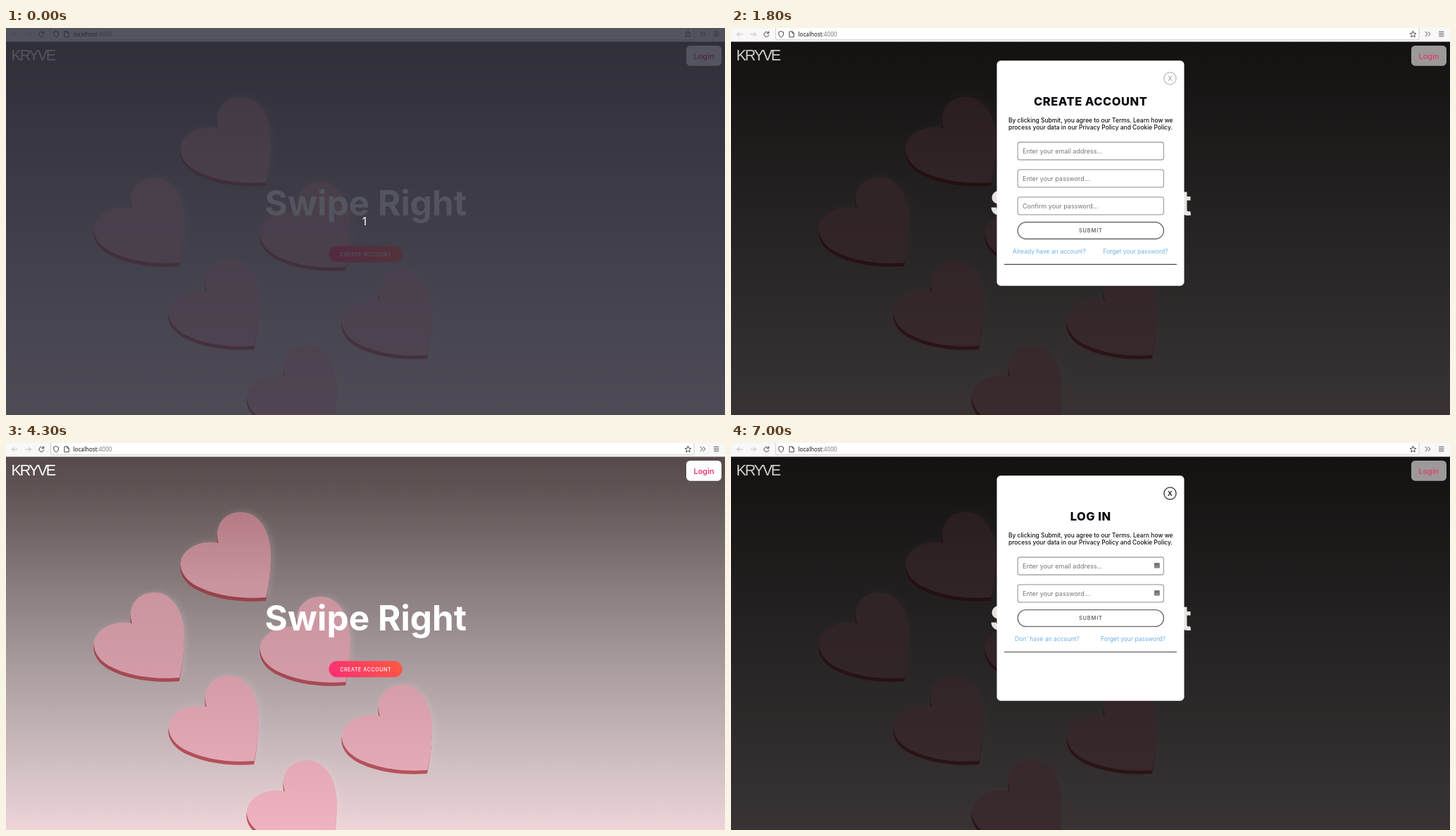
Write an HTML page that moves like this. It is 1021 px wide and 549 px high and loops after 8000 ms.

```html
<!DOCTYPE html>
<html lang="en">
<head>
<meta charset="utf-8">
<title>Landing page with sign-up dialogs</title>
<style>
  html, body { margin: 0; width: 100%; height: 100%; overflow: hidden; background: #fff; }
  svg { display: block; width: 1021px; height: 549px; font-family: Inter, "Open Sans", sans-serif; }
  .mid { text-anchor: middle; }
  .icon { fill: none; stroke: #45454c; stroke-width: 1; stroke-linecap: round; stroke-linejoin: round; }
  .off { stroke: #bdbdc1; }
  .field rect { fill: #fff; stroke: #a6a6a6; stroke-width: 1.3; }
  .field text { font-size: 9px; fill: #757575; }
  .submit rect { fill: #fff; stroke: #696969; stroke-width: 1.4; }
  .submit text { font-size: 7.5px; font-weight: 600; letter-spacing: .75px; fill: #696969; }
  .submit.hot rect { stroke: #111; }
  .submit.hot text { fill: #111; }
  .close circle { fill: #fff; stroke: #b5b5b5; stroke-width: 1.2; }
  .close text { font-size: 9.5px; font-weight: 500; fill: #a2a2a2; }
  .close.hot circle { stroke: #222; }
  .close.hot text { fill: #111; font-weight: 600; }
  .title { font-size: 16.5px; font-weight: 800; letter-spacing: .5px; fill: #0b0711; }
  .terms { font-size: 8.45px; font-weight: 500; fill: #111; }
  .link { font-size: 8.5px; fill: #6fb0e0; }
</style>
</head>
<body>
<svg viewBox="0 0 1021 549" xmlns="http://www.w3.org/2000/svg">
  <defs>
    <linearGradient id="sky" gradientUnits="userSpaceOnUse" x1="0" y1="19" x2="0" y2="549">
      <stop offset="0" stop-color="#554a49"/>
      <stop offset=".09" stop-color="#5f5554"/>
      <stop offset=".34" stop-color="#877b7c"/>
      <stop offset=".53" stop-color="#a4979a"/>
      <stop offset=".72" stop-color="#c0b1b4"/>
      <stop offset=".9" stop-color="#dcc9cc"/>
      <stop offset="1" stop-color="#efd4d9"/>
    </linearGradient>
    <linearGradient id="felt" gradientUnits="userSpaceOnUse" x1="0" y1="97" x2="0" y2="549">
      <stop offset="0" stop-color="#b37b84"/>
      <stop offset=".22" stop-color="#c9949e"/>
      <stop offset=".5" stop-color="#d29ba7"/>
      <stop offset=".8" stop-color="#e4a9b6"/>
      <stop offset="1" stop-color="#f0b3c1"/>
    </linearGradient>
    <linearGradient id="edge" gradientUnits="userSpaceOnUse" x1="0" y1="97" x2="0" y2="549">
      <stop offset="0" stop-color="#893a40"/>
      <stop offset="1" stop-color="#bf5763"/>
    </linearGradient>
    <linearGradient id="warm" x1="0" y1=".6" x2="1" y2=".4">
      <stop offset="0" stop-color="#fe3072"/>
      <stop offset="1" stop-color="#fb5844"/>
    </linearGradient>
    <linearGradient id="warmBack" x1="1" y1=".6" x2="0" y2=".4">
      <stop offset="0" stop-color="#fe3072"/>
      <stop offset="1" stop-color="#f65a42"/>
    </linearGradient>
    <filter id="soft" x="-20%" y="-20%" width="140%" height="140%"><feGaussianBlur stdDeviation="4"/></filter>
  </defs>

  <rect y="19" width="1021" height="530" fill="url(#sky)"/>
  <g id="hearts"></g>
  <rect id="dim" y="19" width="1021" height="530" fill="#000" opacity=".76"/>

  <g id="toolbar">
    <rect width="1021" height="19.5" fill="#f8f8f9"/>
    <rect x="63.5" y="-2" width="913.5" height="18.8" rx="2" fill="#fff" stroke="#cdcdd2" stroke-width="1"/>
    <path class="icon off" d="M16 9H8.5M11.5 6L8.5 9L11.5 12M28 9H35.5M32.500 6L35.500 9L32.500 12"/>
    <path class="icon" d="M53.300 7A3.500 3.500 0 1 0 53.800 10M53.800 5V7.500H51.300"/>
    <path class="icon" d="M71.200 4.800L74.500 6V9Q74.300 11.800 71.200 13.200Q68 11.800 67.800 9V6Z"/>
    <path class="icon" d="M83.300 5H87L89.300 7.300V12.800H83.300ZM87 5V7.300H89.300"/>
    <path class="icon" d="M968.500 4.500L969.800 7.300L972.800 7.700L970.600 9.800L971.200 12.800L968.500 11.300L965.800 12.800L966.400 9.800L964.200 7.700L967.200 7.300Z"/>
    <path class="icon" d="M986 5.500L989 8.500L986 11.500M990 5.500L993 8.500L990 11.500M1005.500 5.700H1012M1005.500 8.500H1012M1005.500 11.300H1012"/>
    <text x="95.500" y="11.800" font-size="8.100" font-family="'Noto Sans', sans-serif" fill="#18181c">localhost<tspan fill="#7c7c82">:4000</tspan></text>
  </g>

  <text id="brand" x="7.500" y="46" font-size="21.500" letter-spacing="-2.200" font-family="'Liberation Sans', Arial, sans-serif">KRYVE</text>
  <g class="mid">
    <rect id="loginBox" x="966" y="25" width="50" height="28.700" rx="5.500"/>
    <text id="loginText" x="991" y="43.500" font-size="11" font-weight="500">Login</text>
    <text id="headline" x="510.800" y="266" font-size="49.500" font-weight="700">Swipe Right</text>
    <g id="create">
      <rect id="createBox" x="458.500" y="309.300" width="104.200" height="23" rx="11.500"/>
      <text x="510.700" y="323.700" font-size="7.200" font-weight="500" letter-spacing=".5" fill="#fff">CREATE ACCOUNT</text>
    </g>
  </g>

  <g id="modal">
    <rect x="377.500" y="46.300" width="266" height="319.400" rx="5.500" fill="#fff"/>
    <g id="close" class="close mid">
      <circle cx="623.500" cy="71.500" r="8.600"/>
      <text x="623.500" y="75">X</text>
    </g>
    <g class="mid">
      <text id="title" class="title" x="510.700" y="109.700"></text>
      <text class="terms" x="510.700" y="133.600">By clicking Submit, you agree to our Terms. Learn how we</text>
      <text class="terms" x="510.500" y="144.300">process your data in our Privacy Policy and Cookie Policy.</text>
    </g>
    <g id="fields"></g>
    <g id="footer" class="mid">
      <g id="submit" class="submit">
        <rect x="407.200" y="275.500" width="207.200" height="23.800" rx="11.900"/>
        <text x="510.800" y="290.200">SUBMIT</text>
      </g>
      <text id="switch" class="link" y="320"></text>
      <text id="forgot" class="link" y="320">Forget your password?</text>
      <path d="M388 335.400H633" stroke="#484848" stroke-width="1.200"/>
    </g>
    <g id="signupIcons" fill="none" stroke="#757575" stroke-width=".9">
      <path d="M602 170.700H608.300V178.700H602ZM603.700 173H606.600M603.700 174.800H606.600M603.700 176.600H606.600"/>
      <g id="key"><circle cx="605" cy="213" r="3.600"/><circle cx="605" cy="212.300" r="1.100" fill="#757575"/><path d="M605 213V218" stroke-width="1.300"/></g>
      <use href="#key" y="39"/>
    </g>
    <g id="loginIcons">
      <g id="fill"><rect x="601" y="170" width="7.800" height="7.500" rx="1" fill="#777"/><path d="M602.500 175.400H607.500" stroke="#ddd" stroke-width=".9" stroke-dasharray="1 .7"/></g>
      <use href="#fill" y="39"/>
    </g>
  </g>

  <g id="curtain">
    <rect width="1021" height="549" fill="#282a36" opacity=".8"/>
    <text class="mid" x="509.500" y="280" font-size="17" font-family="'Noto Sans', sans-serif" fill="#f8f8f2">1</text>
  </g>
</svg>
<script>
const $ = id => document.getElementById(id);
const LOOP = 8000;

// Hearts share one outline; each sits at its own corner.
const HEART = 'C48 25 59 1 87 1C112 1 129 28 129 62C129 86 126 106 122.500 122C84 125 48 119 22 105C6 96 0 83 1 72C3 54 28 39 55 45Z';
const corners = [[247, 97], [124, 211], [360, 217], [230, 329], [476, 342], [341, 449]];

// Absolute coordinates keep the gradients running down the whole page.
const heartPath = (dx, dy) => {
  let n = 0;
  return ('M55 45' + HEART).replace(/[\d.]+/g, v => (+v + (n++ % 2 ? dy : dx)) + ' ');
};

$('hearts').innerHTML = corners.map(([x, y]) => `
  <path d="${heartPath(x + 3, y - 1)}" fill="#ffe4e8" opacity=".16" filter="url(#soft)"/>
  <path d="${heartPath(x - .5, y + 5)}" fill="url(#edge)"/>
  <path d="${heartPath(x, y)}" fill="url(#felt)"/>`).join('');

$('fields').innerHTML = ['Enter your email address...', 'Enter your password...', 'Confirm your password...']
  .map((label, i) => `<g class="field" transform="translate(0 ${i * 38.9})">
    <rect x="407.200" y="162" width="207.200" height="25" rx="3"/>
    <text x="414" y="178">${label}</text></g>`).join('');
const confirmField = $('fields').lastElementChild;

// Each step overrides part of the page state from its time onwards.
const steps = [
  [0, { curtain: true }],
  [100, { curtain: false }],
  [1000, { createHot: true }],
  [1800, { modal: 'signup', createHot: false }],
  [2600, { icons: true }],
  [2800, { submitHot: true }],
  [3300, { submitHot: false }],
  [3700, { closeHot: true }],
  [4300, { modal: '', icons: false, closeHot: false }],
  [5100, { loginHot: true }],
  [5900, { modal: 'login', loginHot: false }],
  [6700, { icons: true }],
  [7000, { closeHot: true }]
];

const show = (el, on) => { el.style.display = on ? '' : 'none'; };
const paint = (id, fill) => $(id).setAttribute('fill', fill);

function render(t) {
  const s = Object.assign({}, ...steps.filter(([at]) => at <= t).map(step => step[1]));
  const open = !!s.modal, login = s.modal === 'login';

  show($('curtain'), s.curtain);
  show($('dim'), open);
  show($('modal'), open);
  show($('create'), !open);
  show(confirmField, !login);
  show($('signupIcons'), s.icons && !login);
  show($('loginIcons'), s.icons && login);

  paint('brand', open ? '#d0cecd' : '#fff');
  paint('headline', open ? '#e6e3e1' : '#fff');
  paint('loginBox', open ? '#9d9998' : s.loginHot ? '#e6e2e1' : '#fff');
  paint('loginText', open ? '#d93f68' : '#ea1c60');
  paint('createBox', s.createHot ? 'url(#warmBack)' : 'url(#warm)');

  $('close').classList.toggle('hot', !!s.closeHot);
  $('submit').classList.toggle('hot', !!s.submitHot);
  $('title').textContent = login ? 'LOG IN' : 'CREATE ACCOUNT';
  $('switch').textContent = login ? "Don' have an account?" : 'Already have an account?';
  $('switch').setAttribute('x', login ? 449 : 452);
  $('forgot').setAttribute('x', login ? 571 : 574.5);
  $('footer').setAttribute('transform', `translate(0 ${login ? -38.9 : 0})`);
}

const start = performance.now();
function tick() {
  render((performance.now() - start) % LOOP);
  requestAnimationFrame(tick);
}
tick();
</script>
</body>
</html>
```
